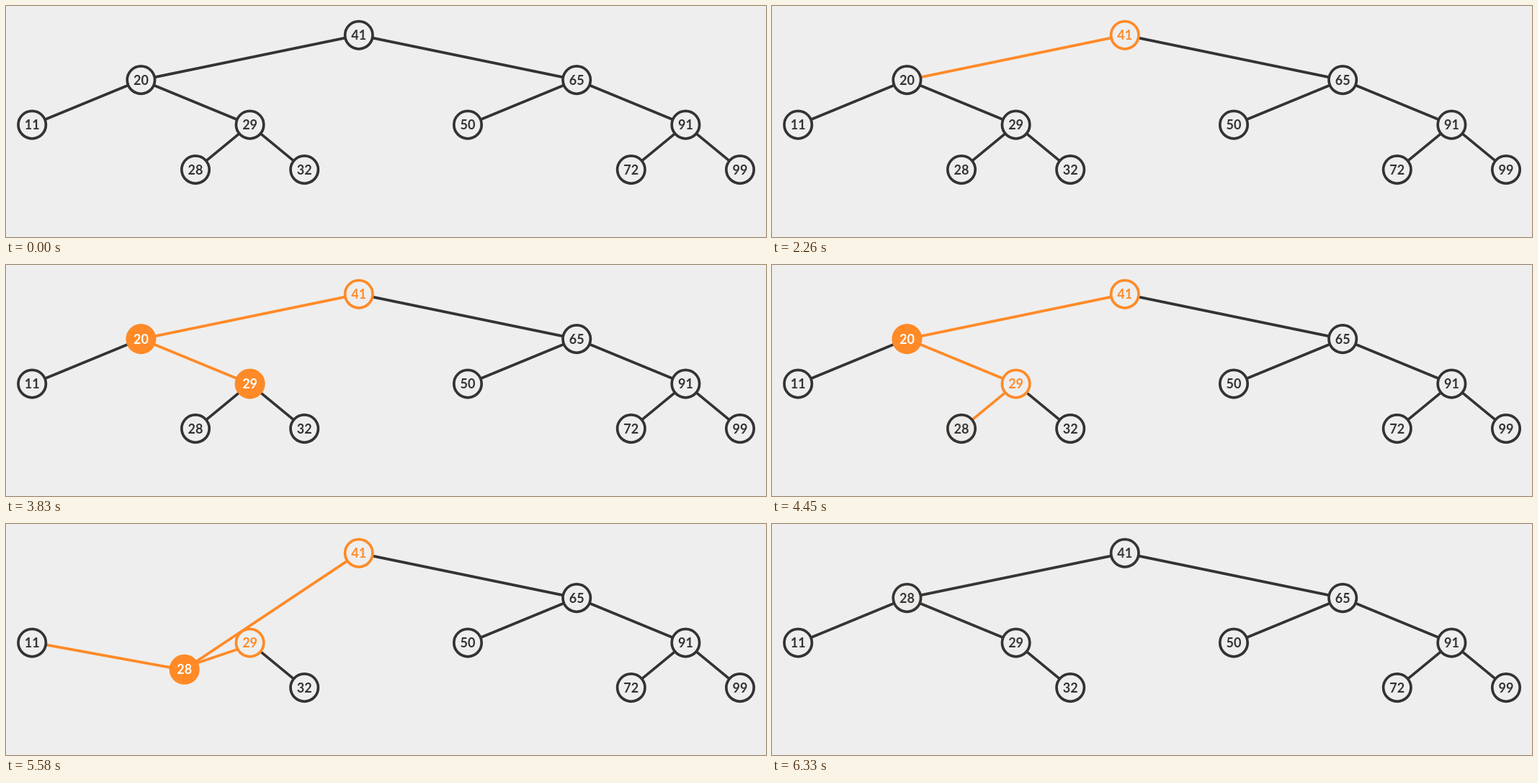
Recreate the animation shown at these times as an HTML page with a canvas. Size 1055 by 322 pixels, loop 7000 ms.

```html
<!DOCTYPE html>
<html lang="en">
<head>
<meta charset="utf-8">
<title>Binary search tree: delete</title>
<style>
  html, body { margin: 0; width: 100%; height: 100%; overflow: hidden; background: #eee; }
  canvas { display: block; width: 1055px; height: 322px; }
</style>
</head>
<body>
<canvas id="stage"></canvas>
<script>
const W = 1055, H = 322, LOOP = 7000;
const DARK = [51, 51, 51], ORANGE = [255, 138, 39], PAPER = [238, 238, 238], WHITE = [255, 255, 255];
const R = 20, EDGE = 3.75, FIRST = 1280, PERIOD = 515, FADE = 500, GROW = 430;

const canvas = document.getElementById('stage');
const ctx = canvas.getContext('2d');
const dpr = window.devicePixelRatio || 1;
canvas.width = W * dpr;
canvas.height = H * dpr;

// value: [column, level]
const GRID = {
  41: [6, 0], 20: [2, 1], 65: [10, 1], 11: [0, 2], 29: [4, 2], 50: [8, 2],
  91: [12, 2], 28: [3, 3], 32: [5, 3], 72: [11, 3], 99: [13, 3]
};
const pos = {};
for (const n in GRID) pos[n] = [36.2 + 75.6 * GRID[n][0], 40.6 + 62.5 * GRID[n][1]];

const STILL_EDGES = [[41, 65], [65, 50], [65, 91], [91, 72], [91, 99], [29, 32]];

const clamp = x => Math.min(1, Math.max(0, x));
const ease = x => x < 0.5 ? 4 * x ** 3 : 1 - 4 * (1 - x) ** 3;
const mix = (a, b, k) => a.map((v, i) => v + (b[i] - v) * k);
const css = c => `rgb(${c.map(Math.round).join(',')})`;

// Screen updates arrive about 15 times a second while something moves.
function tick(t) {
  if (t < 1460) return 0;
  if (t >= 6330) return 6330;
  const start = t < 4920 ? 1460 : 4920;
  return start + Math.floor((t - start + 10) / 66.5) * 66.5;
}

// Edge from rim to rim, as [x1, y1, x2, y2].
function link(a, b) {
  const dx = b[0] - a[0], dy = b[1] - a[1], k = R / Math.hypot(dx, dy);
  return [a[0] + dx * k, a[1] + dy * k, b[0] - dx * k, b[1] - dy * k];
}

function line(p, color, width = EDGE) {
  ctx.strokeStyle = css(color);
  ctx.lineWidth = width;
  ctx.beginPath();
  ctx.moveTo(p[0], p[1]);
  ctx.lineTo(p[2], p[3]);
  ctx.stroke();
}

// An orange stroke runs along the edge, then becomes its colour.
function traverse(p, g) {
  line(p, g < 1 ? DARK : ORANGE);
  if (g > 0 && g < 1) line([p[0], p[1], ...mix(p.slice(0, 2), p.slice(2), g)], ORANGE, 10);
}

// on: filled, out: only outlined, off: back to plain
function node(label, at, { on = 0, out = 0, off = 0, size = 1 } = {}) {
  if (size < 0.01) return;
  ctx.save();
  ctx.translate(at[0], at[1]);
  ctx.scale(size, size);
  ctx.beginPath();
  ctx.arc(0, 0, 19.2, 0, Math.PI * 2);
  ctx.fillStyle = css(mix(mix(PAPER, ORANGE, on), PAPER, Math.max(out, off)));
  ctx.fill();
  ctx.lineWidth = 3.7;
  ctx.strokeStyle = css(mix(mix(DARK, ORANGE, on), DARK, off));
  ctx.stroke();
  ctx.fillStyle = css(mix(mix(mix(DARK, WHITE, on), ORANGE, out), DARK, off));
  ctx.fillText(label, 0, 6.4);
  ctx.restore();
}

function draw(t) {
  const step = (i, span = FADE) => ease(clamp((t - FIRST - PERIOD * i) / span));
  const swap = step(7), rise = step(8), off = step(9);
  const tint = mix(ORANGE, DARK, off);

  ctx.setTransform(dpr, 0, 0, dpr, 0, 0);
  ctx.fillStyle = css(PAPER);
  ctx.fillRect(0, 0, W, H);
  ctx.font = '700 18px Lato, "Open Sans", sans-serif';
  ctx.textAlign = 'center';
  ctx.lineCap = 'butt';

  for (const [a, b] of STILL_EDGES) line(link(pos[a], pos[b]), DARK);

  const top = link(pos[41], pos[20]);
  if (swap === 0) {
    line(link(pos[20], pos[11]), DARK);
    traverse(top, step(1, GROW));
    traverse(link(pos[20], pos[29]), step(3, GROW));
    traverse(link(pos[29], pos[28]), step(5, GROW));
  } else {
    // Edges re-attach to the successor, then follow it up.
    const follow = (before, a, b) => {
      const low = link(a || pos[28], b || pos[28]);
      const high = link(a || pos[20], b || pos[20]);
      return mix(mix(before, low, swap), high, rise);
    };
    line(follow(link(pos[20], pos[11]), null, pos[11]), mix(mix(DARK, ORANGE, swap), DARK, off));
    line(follow(link(pos[20], pos[29]), null, pos[29]), tint);
    line(follow(link(pos[29], pos[28]), pos[41], null), tint);
    if (swap < 1) line([top[0], top[1], ...mix(top.slice(2), top.slice(0, 2), swap)], ORANGE);
  }

  for (const n of [65, 11, 50, 91, 32, 72, 99]) node(n, pos[n]);
  node(20, pos[20], { on: step(2), size: 1 - swap });
  node(41, pos[41], { on: step(0), out: step(1), off });
  node(29, pos[29], { on: step(4), out: step(5), off });
  node(28, mix(pos[28], pos[20], rise), { on: step(6), off });
}

const began = performance.now();
function frame() {
  draw(tick((performance.now() - began) % LOOP));
  requestAnimationFrame(frame);
}
frame();
</script>
</body>
</html>
```
